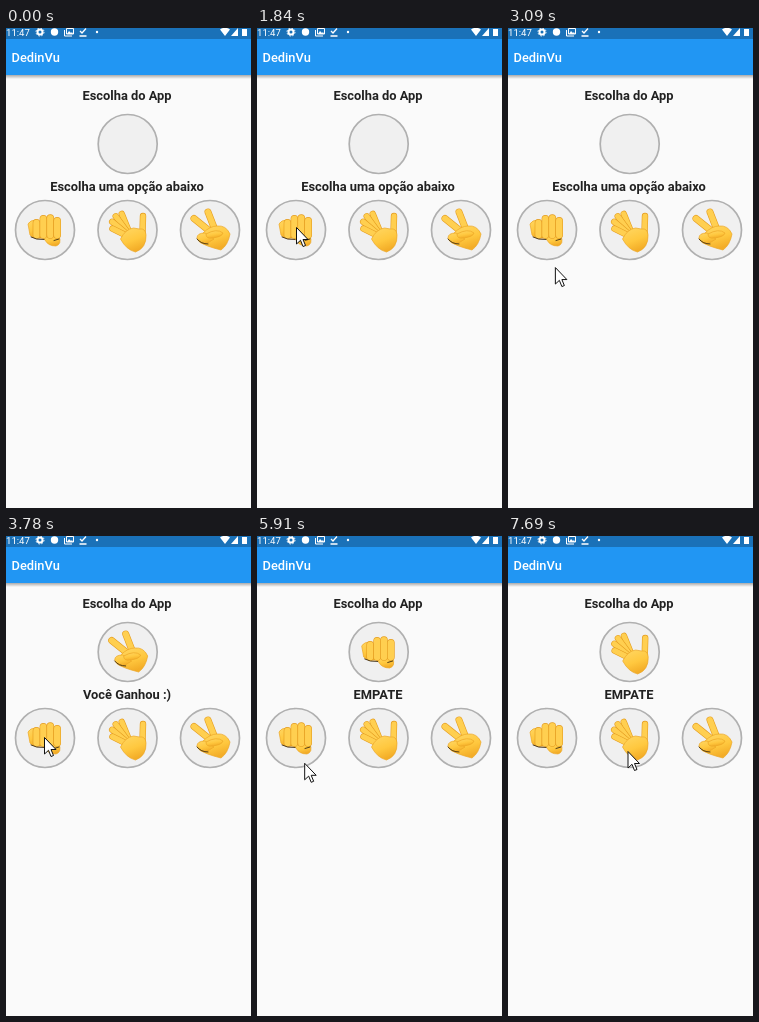
Animation of 245x480 px, one loop 8000 ms. Source, as an HTML page:

```html
<!DOCTYPE html>
<html lang="pt">
<head>
<meta charset="utf-8">
<title>Pedra, papel e tesoura</title>
<style>
  html, body { margin: 0; width: 100%; height: 100%; overflow: hidden; background: #fafafa; }
  svg { display: block; width: 245px; height: 480px; }
  text { font-family: Roboto, sans-serif; }
  .head { font-size: 12.86px; font-weight: 700; fill: #212121; text-anchor: middle; }
  .ring { fill: #f0f0f0; stroke: #b0b0b0; stroke-width: 1.7; }
  .skin { fill: url(#skin); stroke: #eda626; stroke-width: .7; stroke-linejoin: round; }
  .edge, .fill, .dark { fill: none; stroke-linecap: round; }
  .edge { stroke: #e59d20; }
  .fill { stroke: #ffcf50; }
  .dark { stroke: #3d2c12; stroke-width: .9; }
  .line { fill: none; stroke: #fff; }
</style>
</head>
<body>
<svg viewBox="0 0 245 480">
  <defs>
    <linearGradient id="skin" x2=".4" y2="1">
      <stop offset="0" stop-color="#ffd764"/>
      <stop offset=".6" stop-color="#ffc83f"/>
      <stop offset="1" stop-color="#f3ad28"/>
    </linearGradient>
    <linearGradient id="shade" x2="0" y2="1">
      <stop offset="0" stop-opacity=".32"/>
      <stop offset="1" stop-opacity="0"/>
    </linearGradient>
    <g id="rock"></g>
    <g id="paper"></g>
    <g id="scissors"></g>
  </defs>

  <rect y="47" width="245" height="4" fill="url(#shade)"/>
  <rect y="10" width="245" height="37" fill="#2196f3"/>
  <rect width="245" height="11" fill="#1a71b8"/>

  <g fill="#fff">
    <text y="8" font-size="9.6">11:47</text>
    <circle class="line" cx="34" cy="4" r="2.5" stroke-width="2"/>
    <circle class="line" cx="34" cy="4" r="4" stroke-dasharray="1.57"/>
    <circle cx="48.5" cy="4" r="3.7"/>
    <path class="line" d="M58.5 2V8H66M60.5 .5H67.500V6H60.500Z"/>
    <path d="M61 6L63 3L65 5L66 4L67 6Z"/>
    <path class="line" d="M74 3L76 5L80 .5M73.500 8H80.500" stroke-width="1.3"/>
    <circle cx="91" cy="4" r="1.2"/>
    <path d="M214 1.500Q219-2 224 1.500L219 8ZM232 0V8H225ZM236 1H241V8H236Z"/>
    <text x="5.5" y="34" font-size="12.86" font-weight="500">DedinVu</text>
  </g>

  <text class="head" x="121" y="72">Escolha do App</text>
  <text class="head" id="msg" x="121" y="163"></text>
  <g id="board"></g>
  <path id="cursor" d="M.5 .500V17L4.500 13.300L7 19.500L9.500 18.500L7 12.500H12Z"
    fill="#fff" stroke="#111" stroke-linejoin="round"/>
</svg>

<script>
  const LOOP = 8000, HOP = 70;
  const $ = id => document.getElementById(id);
  const times = (n, fn) => Array.from({ length: n }, (_, i) => fn(i)).join('');

  const path = (type, d) => `<path class="${type}" d="${d}"/>`;
  const finger = (x1, y1, x2, y2, width) => ['edge', 'fill'].map((type, i) =>
    `<path class="${type}" stroke-width="${width - i * 1.2}" d="M${x1} ${y1}L${x2} ${y2}"/>`).join('');

  $('rock').innerHTML =
    path('skin', 'M-17-6Q-15-10-9-10L-3 8Q-12 9-15 5Z') +
    path('skin', 'M-5 6H14Q17 14 11 16Q3 16 0 10Z') +
    times(4, i => finger(6.9 * i - 8.5, 1.7 * (i - 1.7) ** 2 - 12, 6.9 * i - 8.5, 5, 7.6)) +
    path('dark', 'M-14 7Q-9 10-1 9.500M9 10.500L14 9');

  // four fingers fan out from the palm
  const fan = i => {
    const a = (248 - 14 * i) * Math.PI / 180;
    const at = r => [4 + r * Math.cos(a), 8 + r * Math.sin(a)];
    return finger(...at(5), ...at(26 + 2 * i - 1.2 * i * i), 6.4);
  };
  $('paper').innerHTML = times(4, fan) + finger(15, 4, 15.5, -14, 6.4) +
    path('skin', 'M-7 9Q-2-1 6-2L12-1Q18-2 18.500 5Q19 18 8 22Q-1 20-7 9Z');

  $('scissors').innerHTML = finger(5, 0, -2, -18, 7) + finger(2, 3, -16, -11.5, 7) +
    path('skin', 'M-7 3Q0-4 7-4Q16-5 20 4Q18 15 11 20Q-5 16-10 12Z') +
    path('skin', 'M-5 3Q-13 3-13 8Q-11 14-4 14L4 9Z') +
    path('skin', 'M-4 4Q7-2 13 3Q12 7 2 8Q-4 9-4 4Z') +
    path('dark', 'M-13 9Q-9 14-2 14');

  const spot = (x, y, hand, id = '') =>
    `<circle class="ring" cx="${x}" cy="${y}" r="29.5"/><use id="${id}" href="#${hand}" x="${x}" y="${y}"/>`;
  $('board').innerHTML = spot(121.7, 116, '', 'pick') +
    ['rock', 'paper', 'scissors'].map((hand, i) => spot(39 + 82.5 * i, 202, hand)).join('');

  const rounds = [
    { start: 0, hand: '', text: 'Escolha uma opção abaixo' },
    { start: 3780, hand: 'scissors', text: 'Você Ganhou :)' },
    { start: 5510, hand: 'rock', text: 'EMPATE' },
    { start: 7110, hand: 'paper', text: 'EMPATE' }
  ];

  // each glide curves from the last stop to the next, bent towards "via"
  const glides = [];
  let stop = [153, 430];
  function glide(start, end, to, via = to) {
    glides.push({ start, end, from: stop, via, to });
    stop = to;
  }
  glide(590, 1360, [72, 233], [122, 277]);
  glide(1360, 1840, [39, 199], [48, 192]);
  glide(1840, 2190, [21, 256], [-10, 230]);
  glide(2190, 2470, [65, 274]);
  glide(2600, 3440, [26, 197], [55, 256]);
  glide(3450, 3520, [38, 201]);
  glide(5170, 5240, [38, 205]);
  glide(5840, 6470, [110, 259], [80, 312]);
  glide(6470, 6750, [119.5, 215]);

  const current = (list, t) => list.filter(item => item.start <= t).pop();

  function pointerAt(t) {
    const g = current(glides, t);
    if (!g) return null;
    const passed = Math.floor((t - g.start) / HOP) * HOP;
    const u = Math.min(1, passed / (g.end - g.start)), v = 1 - u;
    return g.from.map((p, i) => v * v * p + 2 * u * v * g.via[i] + u * u * g.to[i]);
  }

  function draw(t) {
    const round = current(rounds, t), pos = pointerAt(t);
    $('pick').setAttribute('href', '#' + round.hand);
    $('msg').textContent = round.text;
    $('cursor').style.display = pos ? '' : 'none';
    if (pos) $('cursor').setAttribute('transform', `translate(${pos})`);
  }

  const begin = performance.now();
  (function tick() {
    draw((performance.now() - begin) % LOOP);
    requestAnimationFrame(tick);
  })();
</script>
</body>
</html>
```
